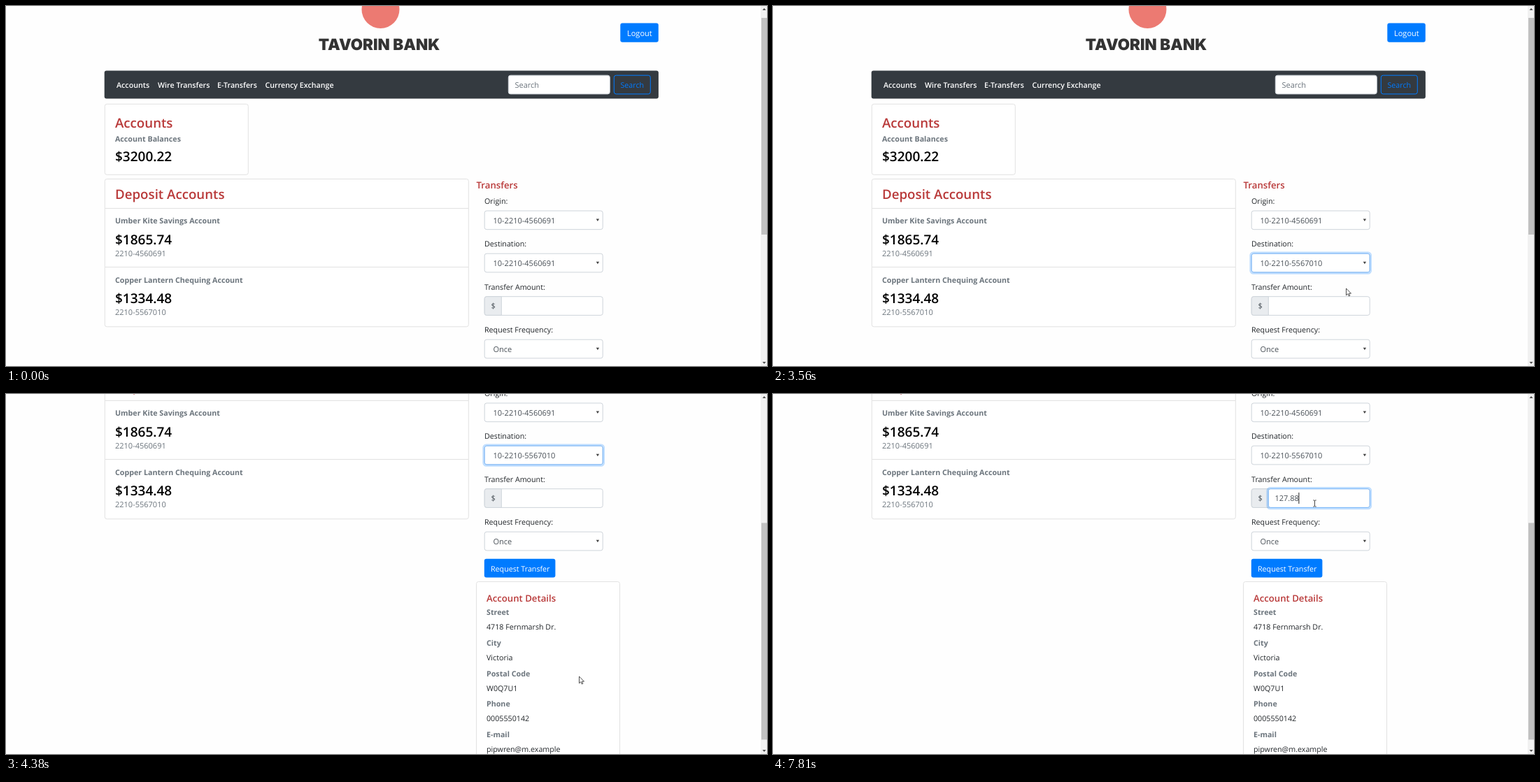
Write an HTML page that moves like this. It is 1088 px wide and 515 px high and loops after 8000 ms.

```html
<!DOCTYPE html>
<html lang="en">
<head>
<meta charset="utf-8">
<title>Bank transfer</title>
<style>
  html, body { margin: 0; width: 100%; height: 100%; overflow: hidden; background: #fefefe; }
  svg { display: block; width: 100%; height: 100%; }
  text { font: 10.7px "Open Sans", "Noto Sans", sans-serif; fill: #212529; text-rendering: geometricPrecision; white-space: pre; }
  .brand { font: 900 22.4px Inter, sans-serif; fill: #333; }
  .nav { font-weight: 600; fill: #fff; }
  .title { font-size: 18.7px; font-weight: 600; fill: #b93a3a; }
  .sub { font-size: 13.2px; font-weight: 600; fill: #b93a3a; }
  .money { font-size: 19px; font-weight: 600; fill: #000; }
  .strong { font-size: 10.7px; font-weight: 700; fill: #6c757d; }
  .muted { font-size: 11px; fill: #6c757d; }
  .field { font-size: 11px; fill: #495057; }
  .white { fill: #fff; }
  .blue { fill: #007bff; }
  .card { fill: #fff; stroke: #e2e2e2; }
  .line { stroke: #e2e2e2; }
  .box { fill: #fff; stroke: #ced4da; }
  .ring { fill: none; stroke: #80bdff; }
  .halo { fill: none; stroke: #007bff; stroke-opacity: .25; stroke-width: 2.4; }
</style>
</head>
<body>
<svg viewBox="0 0 1088 515">
  <g id="page"></g>
  <g id="bar">
    <rect x="1079" width="9" height="515" fill="#f1f1f1"/>
    <rect id="thumb" x="1080" width="8" height="310" fill="#c1c1c1"/>
    <path d="M1081.5 6l2.5-3 2.5 3zM1081.5 509l2.5 3 2.5-3z" fill="#505050"/>
  </g>
  <path id="arrow" d="M0 0V9.8L2.3 7.7L3.8 11L5.3 10.3L3.9 7.2H7Z" fill="#fff" stroke="#222" stroke-width=".8"/>
  <path id="beam" d="M-2.2-4.5H-.5L0-4L.5-4.5H2.2M0-4V4M-2.2 4.5H-.5L0 4L.5 4.5H2.2" fill="none" stroke="#333" stroke-width=".9"/>
</svg>
<script>
const $ = id => document.getElementById(id);
const text = (x, y, s, cls = "", id = "") => `<text x="${x}" y="${y}" class="${cls}" id="${id}">${s}</text>`;
const rect = (x, y, w, h, attrs, r = 3) => `<rect x="${x}" y="${y}" width="${w}" height="${h}" rx="${r}" ${attrs}/>`;
const line = (x1, x2, y) => `<path class="line" d="M${x1} ${y}H${x2}"/>`;
const select = (y, value, id = "") =>
  rect(684.2, y, 169, 26.7, 'class="box"') + text(696.5, y + 18, value, "field", id) +
  `<path d="M843.7 ${y + 11.5}h4.4l-2.2 3.6z" fill="#444"/>`;
const ring = (id, x, y, w) => `<g id="${id}">` +
  rect(x, y, w, 26.7, 'class="ring"') + rect(x - 1.6, y - 1.6, w + 3.2, 29.9, 'class="halo"', 4) + "</g>";
const account = (y, name, sum, number) =>
  text(156, y, name, "strong") + text(156, y + 29.5, sum, "money") + text(156, y + 46.5, number, "muted");

const FIRST = "10-2210-4560691", SECOND = "10-2210-5567010";
const details = [
  ["Street", "4718 Fernmarsh Dr."], ["City", "Victoria"], ["Postal Code", "W0Q7U1"],
  ["Phone", "0005550142"], ["E-mail", "pipwren@m.example"]
];

$("page").innerHTML =
  // header
  '<circle cx="535.5" cy="5" r="27" fill="#ec7a72"/>' +
  '<text x="533.5" y="62.9" class="brand" text-anchor="middle">TAVORIN BANK</text>' +
  rect(878.3, 24.5, 54.5, 27.2, 'class="blue"') + text(888, 42.7, "Logout", "field white") +
  rect(140.7, 92.5, 792.2, 40, 'fill="#343a40"') +
  text(158, 116.8, "Accounts", "nav") + text(217, 116.8, "Wire Transfers", "nav") +
  text(302, 116.8, "E-Transfers", "nav") + text(370.5, 116.8, "Currency Exchange", "nav") +
  rect(718.3, 99.2, 145, 26.7, 'class="box"') + text(727.5, 116.8, "Search", "muted") +
  rect(869.3, 99.2, 52, 26.7, 'fill="none" stroke="#007bff"') + text(878.5, 116.8, "Search", "blue") +
  // balances
  rect(141.3, 140.3, 205, 101, 'class="card"') +
  text(156, 174.3, "Accounts", "title") + text(156, 193.7, "Account Balances", "strong") +
  text(156, 221.8, "$3200.22", "money") +
  rect(141.3, 247.5, 520, 211.3, 'class="card"') + text(156, 276.3, "Deposit Accounts", "title") +
  line(142, 661, 289.5) + line(142, 661, 373.5) +
  account(311, "Umber Kite Savings Account", "$1865.74", "2210-4560691") +
  account(395.5, "Copper Lantern Chequing Account", "$1334.48", "2210-5567010") +
  // transfer form
  text(672.5, 261.2, "Transfers", "sub") +
  text(684, 283, "Origin:") + select(293, FIRST) +
  text(684, 344.2, "Destination:") + select(354.2, FIRST, "dest") + ring("destRing", 684.2, 354.2, 169) +
  text(684, 405.7, "Transfer Amount:") +
  rect(684.2, 415.7, 169, 26.7, 'class="box"') +
  '<path d="M708.3 415.7H687.2q-3 0-3 3v20.7q0 3 3 3h21.1z" fill="#e9ecef" stroke="#ced4da"/>' +
  text(693.5, 433.3, "$", "field") + ring("amountRing", 708.3, 415.7, 145) +
  text(717.5, 433.3, "", "field", "amount") +
  '<rect id="caret" y="421" width="1" height="16" fill="#222"/>' +
  text(684, 467, "Request Frequency:") + select(477.2, "Once") +
  rect(683.8, 515.7, 101.6, 26.8, 'class="blue"') + text(693, 533.6, "Request Transfer", "white") +
  // details
  rect(672.5, 548.5, 205, 280, 'class="card"') + text(687, 577, "Account Details", "sub") +
  details.map(([k, v], i) =>
    text(687, 596.3 + i * 43.6, k, "strong") + text(687, 617.4 + i * 43.6, v)).join("") +
  // option list
  '<g id="list"><path d="M684.5 414V380.5H853.5V414" fill="#fff" stroke="#333"/>' +
  '<rect id="hot" x="685" width="168" height="16.5" fill="#1e90ff"/>' +
  text(697, 393.7, FIRST, "field", "opt0") + text(697, 410, SECOND, "field", "opt1") + "</g>";

const path = [
  [500, 986, 518], [950, 917, 445.5], [1150, 917, 445.5], [1700, 829, 371.5], [2000, 837.5, 380.5],
  [2350, 837.5, 380.5], [3200, 819.5, 403], [3300, 819.5, 404], [4530, 819.5, 404], [5000, 773, 219],
  [5190, 773, 219], [5440, 774.5, 159.5], [5690, 774.5, 159.5], [5790, 774.5, 156.5]
];
const typed = [[6640, "1"], [6840, "12"], [7040, "127"], [7290, "127."], [7590, "127.8"], [7810, "127.88"]];

const clamp = v => Math.max(0, Math.min(1, v));
const show = (id, on) => $(id).setAttribute("visibility", on ? "visible" : "hidden");
const set = (id, name, v) => $(id).setAttribute(name, v);

function pointer(t) {
  const i = path.findIndex(k => k[0] > t);
  if (i === 0) return path[0].slice(1);
  if (i < 0) return path[path.length - 1].slice(1);
  const [t0, x0, y0] = path[i - 1], [t1, x1, y1] = path[i];
  const p = (t - t0) / (t1 - t0), e = p * p * (3 - 2 * p);
  return [x0 + (x1 - x0) * e, y0 + (y1 - y0) * e];
}

function draw(t) {
  const step = Math.floor(t / 50) * 50;

  const p = clamp((Math.floor((t - 3920) / 50) + 1) / 6);
  const scroll = Math.round(280 * (1 - (1 - p) ** 1.362));
  set("page", "transform", `translate(0 ${-scroll})`);
  set("thumb", "y", 17 + scroll * 0.598);

  const [x, y] = pointer(step), inField = y < 163;
  show("arrow", !inField);
  show("beam", inField);
  set(inField ? "beam" : "arrow", "transform", `translate(${x} ${y})`);

  const second = y >= 398;
  show("list", t >= 2110 && t < 3450);
  set("hot", "y", second ? 397.5 : 381);
  $("opt0").style.fill = second ? "" : "#fff";
  $("opt1").style.fill = second ? "#fff" : "";
  $("dest").textContent = t < 3500 ? FIRST : SECOND;

  const moved = clamp((step - 5900) / 150);
  set("destRing", "opacity", clamp((step - 2000) / 100) * (1 - moved));
  set("amountRing", "opacity", moved);

  const entry = typed.filter(k => k[0] <= t).pop();
  $("amount").textContent = entry ? entry[1] : "";
  set("caret", "x", 717 + (entry ? $("amount").getComputedTextLength() : 0));
  show("caret", t >= 5940 && t < 6490 || t >= 6640);
}

const start = performance.now();
function tick() {
  draw((performance.now() - start) % 8000);
  requestAnimationFrame(tick);
}
tick();
</script>
</body>
</html>
```
